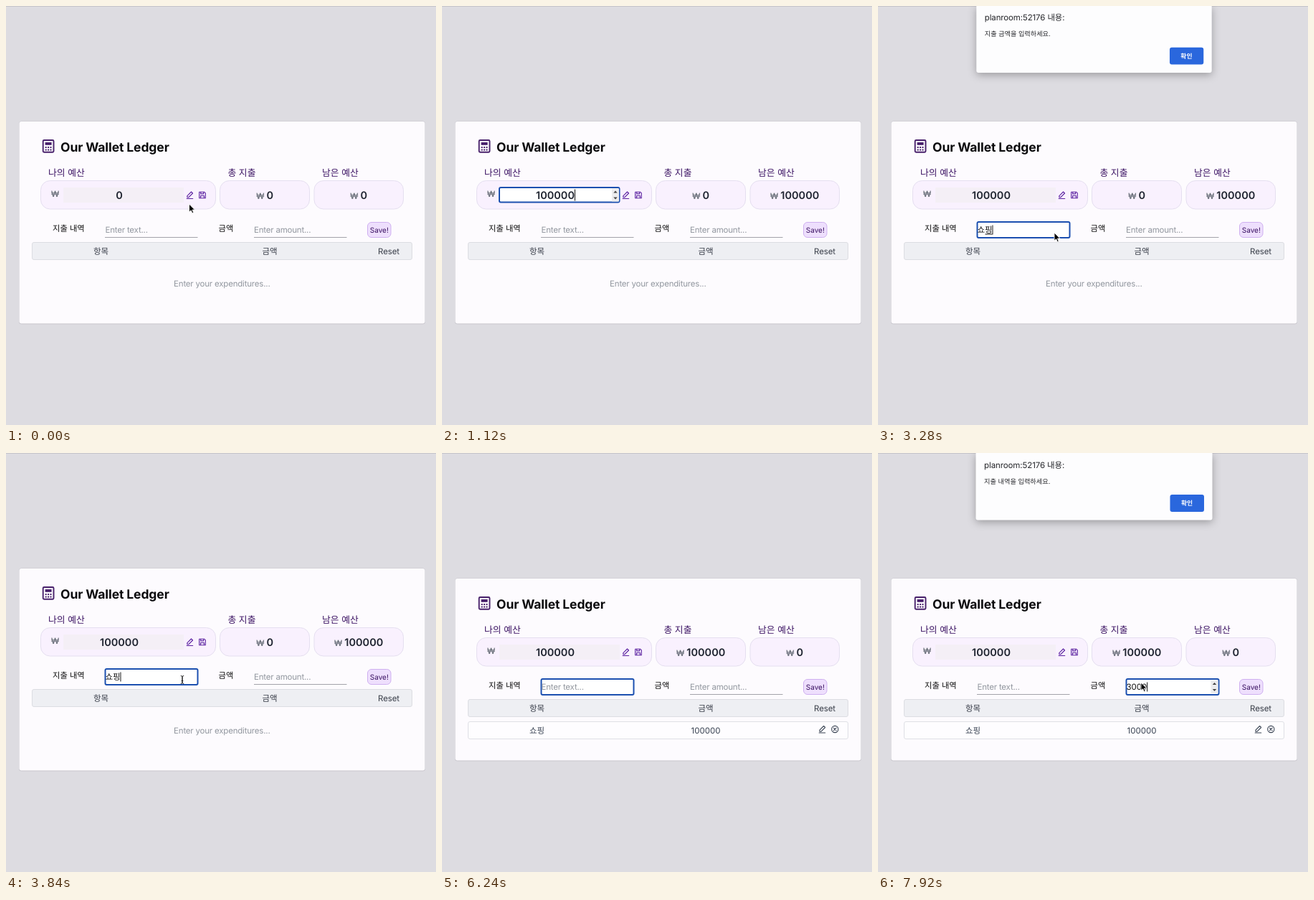
Write an HTML page that moves like this. It is 600 px wide and 584 px high and loops after 8 s.

```html
<!DOCTYPE html>
<html lang="ko">
<head>
<meta charset="utf-8">
<title>Wallet ledger</title>
<style>
  html, body { margin: 0; width: 100%; height: 100%; overflow: hidden; background: #dddce1; }
  svg { display: block; }
  text {
    font-family: Inter, "Noto Sans CJK KR", "Noto Sans CJK JP", "Noto Sans CJK", sans-serif;
    font-size: 11.5px; fill: #111; white-space: pre; text-rendering: geometricPrecision;
  }
  .mid { text-anchor: middle; }
  .title { font-size: 17.5px; font-weight: 700; fill: #0a0a0c; letter-spacing: -.1px; }
  .label { font-size: 12.8px; fill: #3b1263; }
  .name { font-size: 11.3px; }
  .head { font-weight: 500; fill: #3a3f4a; letter-spacing: -.1px; }
  .cell { fill: #374151; }
  .hint { fill: #92979f; letter-spacing: -.2px; }
  .num { font-size: 14.5px; font-weight: 600; fill: #1f2430; }
  .won { font-size: 11.5px; font-weight: 600; fill: #70757f; }
  .pill { fill: #f9f1fe; stroke: #e5dff0; }
  .line { stroke: #a3a3aa; }
  .focus { fill: #fff; stroke: #1c50b0; stroke-width: 2; }
  .icon { fill: none; stroke: #5b21a0; stroke-width: 1.1; stroke-linejoin: round; stroke-linecap: round; }
  .dark { stroke: #374151; }
  #dialog { transform-origin: 301.5px 0; filter: drop-shadow(0 3px 6px rgba(0,0,0,.3)); }
</style>
</head>
<body>
<svg width="600" height="584" viewBox="0 0 600 584">
  <defs>
    <g id="pencil" class="icon">
      <path d="M-3.6 3.2v-2.1L2 -4.5l2 2L-1.6 3.2zM-4.3 5H4.2"/>
    </g>
    <g id="disk" class="icon">
      <path d="M-4.3 -4.3H2.6L4.3 -2.6V4.3H-4.3zM-2.3 -4.3V-1.6H1.6V-4.3M-2.4 4.3V1H2.4V4.3"/>
    </g>
    <g id="spin">
      <rect x="-5" y="-9" width="10" height="18" fill="#ececee"/>
      <path d="M-2.7 -3L0 -6L2.7 -3zM-2.7 3L0 6L2.7 3z" fill="#444"/>
    </g>
  </defs>
  <rect width="600" height="584" fill="#dddce1"/>
  <rect width="600" height="1" fill="#c6c5ca"/>
  <rect id="shade" x="18" width="567" rx="3.5" fill="#c9c8ce"/>
  <rect id="card" x="18.5" width="566" rx="3" fill="#fdfbfe"/>

  <g id="main">
    <rect x="51.7" y="187" width="14.8" height="16.8" rx="1.5" fill="none" stroke="#48206b" stroke-width="1.9"/>
    <rect x="54.6" y="190" width="9" height="3.8" fill="#48206b"/>
    <path d="M54.7 197h2M58.1 197h2M61.5 197h2M54.7 200.5h2M58.1 200.5h2M61.5 200.5h2" stroke="#48206b" stroke-width="2"/>
    <text class="title" x="76" y="203">Our Wallet Ledger</text>

    <text class="label" x="59" y="237">나의 예산</text>
    <text class="label" x="309.5" y="237">총 지출</text>
    <text class="label" x="441" y="237">남은 예산</text>
    <rect class="pill" x="48.5" y="243.5" width="244" height="39.5" rx="13"/>
    <rect class="pill" x="298.5" y="243.5" width="125" height="39.5" rx="13"/>
    <rect class="pill" x="430" y="243.5" width="124.5" height="39.5" rx="13"/>

    <text class="won mid" x="68.5" y="266">₩</text>
    <rect id="budgetOff" x="80" y="253" width="168" height="21" fill="#f4eff6"/>
    <g id="budgetOn">
      <rect class="focus" x="80" y="253" width="167.5" height="20.5" rx="2"/>
      <use href="#spin" x="242" y="263.5"/>
    </g>
    <text id="budget" class="num mid" x="158" y="268.5"></text>
    <use href="#pencil" x="256.5" y="263.5"/>
    <use href="#disk" x="274" y="263.5"/>
    <text class="mid" x="361" y="268.5"><tspan class="won">₩</tspan><tspan id="spent" class="num" dx="3"></tspan></text>
    <text class="mid" x="492" y="268.5"><tspan class="won">₩</tspan><tspan id="left" class="num" dx="3"></tspan></text>

    <text class="name" x="65" y="314">지출 내역</text>
    <text class="name" x="296.5" y="314">금액</text>
    <path id="itemOff" class="line" d="M138 322.5H267.5"/>
    <rect id="itemOn" class="focus" x="138.5" y="301" width="129" height="22" rx="2"/>
    <text id="itemHint" class="hint" x="138.5" y="316">Enter text...</text>
    <text id="item" x="138.5" y="316"></text>
    <path id="compose" stroke="#111"/>
    <path id="costOff" class="line" d="M346 322.5H475.5"/>
    <g id="costOn">
      <rect class="focus" x="346.5" y="301" width="129" height="22" rx="2"/>
      <use href="#spin" x="469.5" y="312"/>
    </g>
    <text id="costHint" class="hint" x="346" y="316">Enter amount...</text>
    <text id="cost" x="346.5" y="316"></text>
    <path id="caret" stroke="#111"/>
    <rect x="504.5" y="301.5" width="32.5" height="21" rx="5.5" fill="#eedffd" stroke="#cfb0f0"/>
    <text class="mid" x="520.8" y="315.7" style="font-size:10px;fill:#3b1263">Save!</text>

    <rect x="36.5" y="329.5" width="530" height="24" rx="2.5" fill="#eeeff3" stroke="#dcdde2"/>
    <text class="head mid" x="132.5" y="346">항목</text>
    <text class="head mid" x="368" y="346">금액</text>
    <text class="head mid" x="534" y="346" style="font-weight:400">Reset</text>
  </g>

  <text id="empty" class="hint mid" x="301.3" y="390.5">Enter your expenditures...</text>
  <g id="row">
    <rect x="36.5" y="374.5" width="530" height="24" rx="2.5" fill="#fefdff" stroke="#dfe0e5"/>
    <text class="cell mid" x="132.5" y="390.5">쇼핑</text>
    <text class="cell mid" x="368" y="390.5">100000</text>
    <use href="#pencil" x="530.5" y="385" style="--c:#374151"/>
    <path class="icon dark" d="M527 386.1L532.6 380.5l2 2L529 388.2h-2zM526.2 390h8.5"/>
    <circle class="icon dark" cx="548.3" cy="385" r="4.6"/>
    <path class="icon dark" d="M546.5 383.2l3.6 3.6m0-3.6l-3.6 3.6"/>
  </g>

  <g id="dialog">
    <path d="M136.5 0H466.5V90.5a3 3 0 0 1-3 3H139.5a3 3 0 0 1-3-3z" fill="#fdfdfe"/>
    <text x="148" y="20.5" style="letter-spacing:-.1px;fill:#26272b">planroom:52176 내용:</text>
    <text id="notice" x="148" y="42.5" style="font-size:9.2px;fill:#26272b"></text>
    <rect x="407.5" y="58" width="47.5" height="24" rx="3" fill="#2a67dd"/>
    <text class="mid" x="431" y="73" style="font-size:8.8px;font-weight:700;fill:#fff">확인</text>
  </g>

  <path id="arrow" d="M0 0V11.2L2.6 8.8L4.3 12.7L6.2 11.9L4.5 8.1H8z" fill="#000" stroke="#fff" stroke-width=".9"/>
  <path id="beam" d="M-2.2 -5.5Q0 -5.5 0 -4V4Q0 5.5 -2.2 5.5M2.2 -5.5Q0 -5.5 0 -4V4Q0 5.5 2.2 5.5M-1.3 1.5H1.3" fill="none" stroke="#222"/>
</svg>
<script>
const LOOP = 8000, TICK = 80, SAVED = 6240;
const $ = Object.fromEntries([...document.querySelectorAll('[id]')].map(e => [e.id, e]));
$.row.querySelector('use').remove();

// Step tables: [start time, value]
const BUDGET = [[0, '0'], ...[...'100000'].map((_, i) => [640 + i * TICK, '100000'.slice(0, i + 1)])];
const ITEM = [[0, ''], [2480, 'ㅅ'], [2560, '쇼'], [2640, '쇼ㅍ'], [2720, '쇼피'], [2800, '쇼핑'], [SAVED, '']];
const COST = [[0, ''], [5360, '1'], [5600, '10'], [5760, '100'], [5840, '1000'], [5920, '10000'],
  [6000, '100000'], [SAVED, ''], [7120, '3'], [7200, '30'], [7280, '300'], [7360, '3000']];
const FOCUS = [[0, ''], [400, 'budget'], [1600, ''], [2000, 'item'], [5200, 'cost'], [SAVED, 'item'], [6960, 'cost']];
const CARET = [[0, 1], [4240, 0], [5200, 1], [5600, 0], [5760, 1], [SAVED, 0], [6640, 1]];
const POINTER = [[0, 'arrow'], [640, ''], [1600, 'arrow'], [1840, 'beam'], [2480, ''], [3120, 'arrow'],
  [3680, 'beam'], [4880, 'arrow'], [5040, 'beam'], [5360, ''], [6640, 'arrow'], [6800, 'beam'], [7120, ''], [7600, 'arrow']];
const PATH = [[0, 255.5, 276], [80, 255.5, 276], [320, 257, 264], [1600, 264, 270], [2000, 246, 316],
  [4800, 246, 316], [5120, 368, 316], [6640, 362, 308], [6880, 367, 320], [LOOP, 367, 320]];
const DIALOGS = [
  { open: 2960, close: 3520, text: '지출 금액을 입력하세요.' },
  { open: 7520, close: LOOP, text: '지출 내역을 입력하세요.' }
];

const at = (steps, t) => steps.filter(s => s[0] <= t).pop()[1];
const show = (el, on) => { el.style.display = on ? '' : 'none'; };
const clamp = v => Math.max(0, Math.min(1, v));

function position(t) {
  const i = Math.max(1, PATH.findIndex(p => p[0] > t));
  const [t0, x0, y0] = PATH[i - 1], [t1, x1, y1] = PATH[i];
  const p = (t - t0) / (t1 - t0), e = p * p * (3 - 2 * p);
  return [x0 + (x1 - x0) * e, y0 + (y1 - y0) * e];
}

function drawFields(t, saved) {
  const focus = at(FOCUS, t);
  const values = { budget: at(BUDGET, t), item: at(ITEM, t), cost: at(COST, t) };
  for (const [id, value] of Object.entries(values)) {
    $[id].textContent = value;
    show($[id + 'On'], focus === id);
    show($[id + 'Off'], focus !== id);
    if ($[id + 'Hint']) show($[id + 'Hint'], !value);
  }
  $.spent.textContent = saved ? values.budget : '0';
  $.left.textContent = saved ? '0' : values.budget;

  show($.caret, focus && at(CARET, t));
  if (focus) {
    const width = values[focus] ? $[focus].getComputedTextLength() : 0;
    const center = focus === 'budget';
    const x = center ? 158.5 + width / 2 : +$[focus].getAttribute('x') + width + .3;
    $.caret.setAttribute('d', center ? `M${x} 255.5V271.5` : `M${x} 305.5V318.5`);
    $.compose.setAttribute('d', `M${x - 10.5} 318H${x - .5}`);
  }
  show($.compose, t >= 2480 && t < 3520);
}

function drawDialog(t) {
  const box = DIALOGS.find(d => t >= d.open && t < d.close + 240);
  show($.dialog, box);
  if (!box) return;
  const p = clamp((t - box.open) / 400);
  const fade = 1 - clamp((t - box.close + TICK) / 320);
  $.notice.textContent = box.text;
  $.dialog.style.transform = `scale(${1 - .12 * (1 - p) ** 2})`;
  $.dialog.style.opacity = Math.min(1, p * 2.5) * fade;
}

function drawPointer(t) {
  const kind = at(POINTER, t), [x, y] = position(t);
  for (const id of ['arrow', 'beam']) {
    show($[id], kind === id);
    $[id].setAttribute('transform', `translate(${x} ${y})`);
  }
}

function draw(ms) {
  const t = Math.floor((ms % LOOP) / TICK) * TICK;
  const saved = t >= SAVED;
  const top = saved ? 175 : 161, height = saved ? 253.5 : 281.5;
  $.card.setAttribute('y', top);
  $.card.setAttribute('height', height);
  $.shade.setAttribute('y', top - .4);
  $.shade.setAttribute('height', height + 1.4);
  $.main.setAttribute('transform', `translate(0 ${saved ? 14 : 0})`);
  show($.empty, !saved);
  show($.row, saved);
  drawFields(t, saved);
  drawDialog(t);
  drawPointer(t);
}

const start = performance.now();
function loop() {
  draw(performance.now() - start);
  requestAnimationFrame(loop);
}
loop();
</script>
</body>
</html>
```
